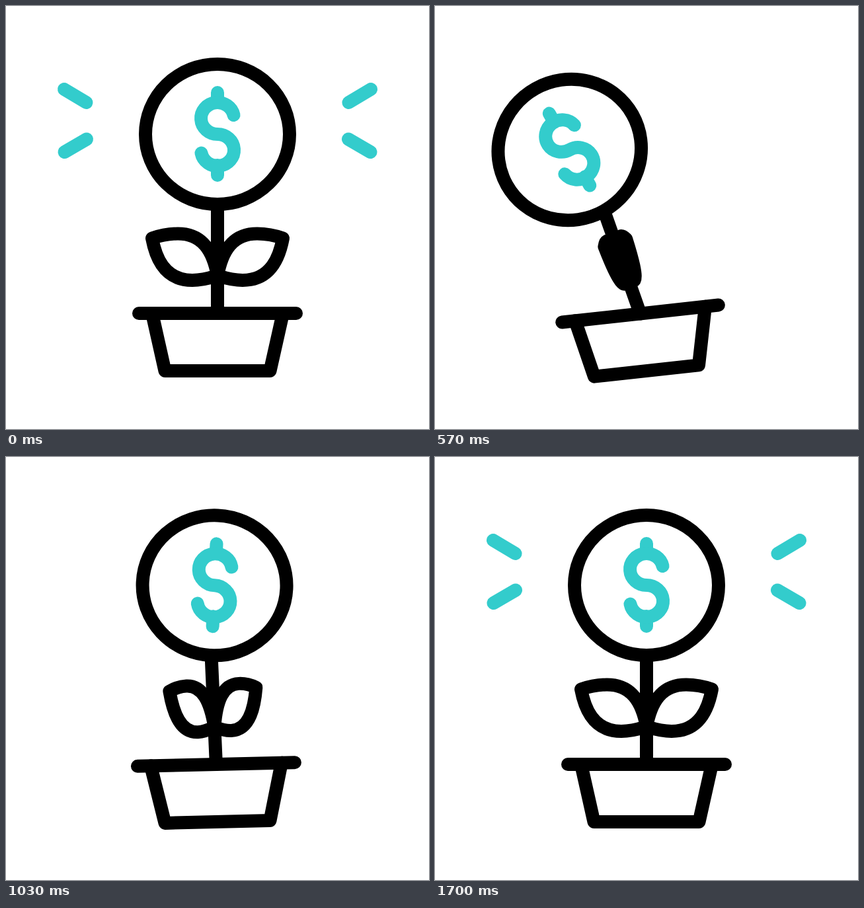
An HTML page that plays this animation: 640x640 px, repeating every 2000 ms.

```html
<!DOCTYPE html>
<html lang="en">
<head>
<meta charset="utf-8">
<title>Swaying money plant</title>
<style>
  html, body { margin: 0; width: 100%; height: 100%; overflow: hidden; background: #fff; }
  svg { display: block; width: 100vw; height: 100vh; }
  path, ellipse { fill: none; stroke: #000; stroke-width: 20; stroke-linecap: round; stroke-linejoin: round; }
  .teal path { stroke: #33cccc; }
  .leaf { vector-effect: non-scaling-stroke; }
</style>
</head>
<body>
<svg viewBox="0 0 640 640">
  <g id="sparks" class="teal">
    <path pathLength="1" d="M121.5 146L88 126"/>
    <path pathLength="1" d="M122 201.5L88.5 221"/>
    <path pathLength="1" d="M518.5 146L552 126"/>
    <path pathLength="1" d="M518 201.5L551.5 221"/>
  </g>
  <g id="pot">
    <path d="M201 465H439"/>
    <path d="M221 465L240.5 552H399.5L419 465"/>
    <g id="stem">
      <path d="M320 465V300"/>
      <g id="leaves">
        <path class="leaf" d="M0 0C-7-38-23-63.5-60-63.5C-74-63.5-88-60.5-99-56.5C-94-30-82 7-38 7C-22 7-10 3 0 0Z"/>
        <path class="leaf" d="M0 0C7-38 23-63.5 60-63.5C74-63.5 88-60.5 99-56.5C94-30 82 7 38 7C22 7 10 3 0 0Z"/>
      </g>
      <g id="head">
        <ellipse cx="320" cy="194" rx="109" ry="106"/>
        <g class="teal">
          <path d="M320 131V146M320 241V256"/>
          <path d="M344.5 165A25 24 0 1 0 320 194A25 24 0 1 1 295.5 222.5"/>
        </g>
      </g>
    </g>
  </g>
</svg>
<script>
  const LOOP = 2000, STEP = 1000 / 30, LAST = 51;

  // Each track is a list of [ms, value]; angles are relative to the parent part.
  const tracks = {
    pot:    [[0, 0], [433, -13], [800, 10], [1133, -4.3], [1433, 0]],
    stem:   [[30, 0], [530, -13.7], [867, 6.2], [1200, -8.6], [1500, 0]],
    head:   [[0, 0], [567, -10], [967, 6.2], [1300, -3.8], [1600, 0]],
    leaves: [[225, 1], [533, 0.15], [833, 1], [1133, 0.55], [1567, 1]],
    sparks: [[0, 1], [1, 0], [1470, 0], [1690, 1]]
  };

  const el = id => document.getElementById(id);
  const sparks = el('sparks');

  // Sine ease in and out between neighbouring keys.
  function valueAt(keys, t) {
    const i = keys.findIndex(k => k[0] > t);
    if (i === 0) return keys[0][1];
    if (i < 0) return keys[keys.length - 1][1];
    const [t0, a] = keys[i - 1], [t1, b] = keys[i];
    return a + (b - a) * (1 - Math.cos(Math.PI * (t - t0) / (t1 - t0))) / 2;
  }

  function turn(id, t, x, y) {
    el(id).setAttribute('transform', `rotate(${valueAt(tracks[id], t)} ${x} ${y})`);
  }

  function pose(t) {
    turn('pot', t, 320, 552);
    turn('stem', t, 320, 465);
    turn('head', t, 320, 300);
    el('leaves').setAttribute('transform', `translate(320 408) scale(${valueAt(tracks.leaves, t)} 1)`);

    const grown = valueAt(tracks.sparks, t);
    sparks.style.visibility = grown > 0.001 ? 'visible' : 'hidden';
    sparks.style.strokeDasharray = grown < 1 ? `${grown} 2` : 'none';
  }

  // The motion runs at 30 steps a second, then holds until the loop ends.
  const start = performance.now();
  function tick() {
    const t = (performance.now() - start) % LOOP;
    pose(Math.min(LAST, Math.floor((t + 3.4) / STEP)) * STEP);
    requestAnimationFrame(tick);
  }
  tick();
</script>
</body>
</html>
```
